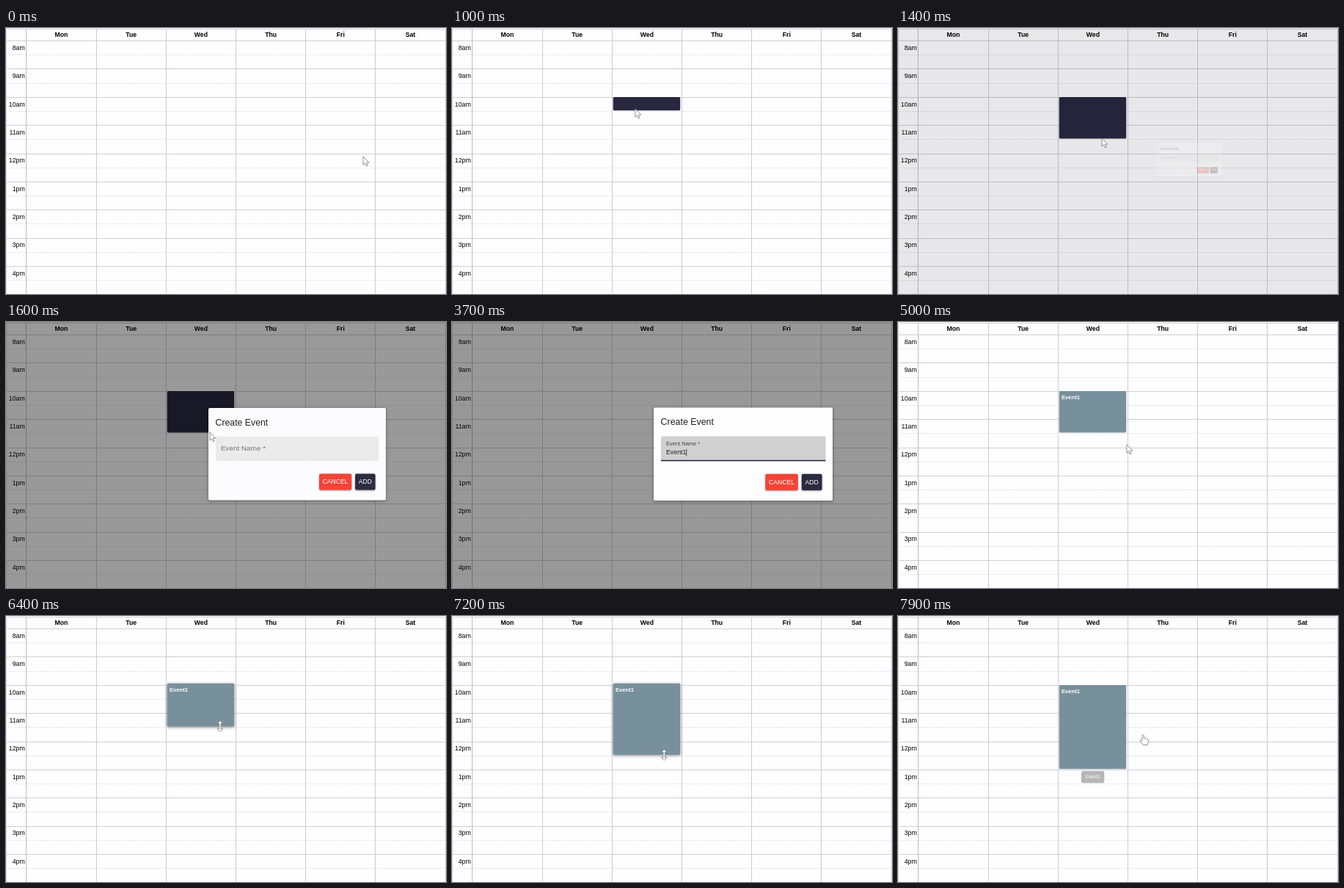
An HTML page for the animation above (8000 ms loop, 600 by 362 pixels).

```html
<!DOCTYPE html>
<html lang="en">
<head>
<meta charset="utf-8">
<title>Week planner</title>
<style>
html, body { margin: 0; width: 100%; height: 100%; overflow: hidden; background: #fefdff; }
svg { display: block; width: 600px; height: 362px; }
text { font-family: "Liberation Sans", Arial, sans-serif; }
.shadow { filter: drop-shadow(0 1px 1px rgba(0,0,0,.4)); }
.lift { filter: drop-shadow(0 1px 2px rgba(0,0,0,.4)); }
</style>
</head>
<body>
<svg id="stage" viewBox="0 0 600 362"></svg>
<script>
const LOOP = 8000, STEP = 100;
const LEFT = 27.9, COLUMN = 95.2, TOP = 17.5, ROW = 38.375, SLOT = ROW / 2;
const NAVY = '#28273f', SLATE = '#78909c', PAPER = '#fefdff';
const BLOCK_TOP = 94, BLOCK_HEIGHT = 3 * SLOT - 1, EDGE = 150;
const CENTER = { x: 397, y: 179.7 };
const stage = document.getElementById('stage');

function set(el, attrs) {
  for (const key in attrs) el.setAttribute(key, attrs[key]);
}
function add(parent, tag, attrs, text = '') {
  const el = document.createElementNS('http://www.w3.org/2000/svg', tag);
  set(el, attrs);
  el.textContent = text;
  return parent.appendChild(el);
}
const show = (el, visible) => set(el, { visibility: visible ? 'visible' : 'hidden' });
const rect = (parent, x, y, width, height, fill, rx = 0, more = {}) =>
  add(parent, 'rect', { x, y, width, height, fill, rx, ...more });
const label = (parent, x, y, size, text, more = {}) =>
  add(parent, 'text', { x, y, 'font-size': size, fill: '#222', ...more }, text);
const line = (x1, y1, x2, y2, stroke, more = {}) =>
  add(stage, 'line', { x1, y1, x2, y2, stroke, ...more });

const clamp = (v, low, high) => Math.max(low, Math.min(high, v));
const ramp = (t, from, to) => clamp((t - from) / (to - from), 0, 1);
const smooth = (t, from, to) => { const k = ramp(t, from, to); return k * k * (3 - 2 * k); };
const pulse = (t, from, to) => ramp(t, from, from + 200) - ramp(t, to, to + 200);
const crisp = v => Math.floor(v) + .5;

function buildCalendar() {
  rect(stage, 0, 0, 600, 362, PAPER);
  line(0, 1.5, 600, 1.5, '#d2d1d4');
  for (let i = 0; i < 9; i++) {
    const y = TOP + i * ROW, hour = (i + 7) % 12 + 1;
    line(0, crisp(y), 600, crisp(y), '#d0cfd2');
    line(0, crisp(y + SLOT), 600, crisp(y + SLOT), '#dbdadd', { 'stroke-dasharray': '1 1' });
    label(stage, 25.8, y + 12.3, 8.8, hour + (i < 4 ? 'am' : 'pm'), { 'text-anchor': 'end', fill: '#000' });
  }
  line(.5, 1, .5, 362, '#d6d5d8');
  line(27.5, 1, 27.5, 362, '#bdbcbf');
  ['Mon', 'Tue', 'Wed', 'Thu', 'Fri', 'Sat'].forEach((day, i) => {
    const x = crisp(LEFT + (i + 1) * COLUMN);
    line(x, 1, x, 362, '#cdccd0');
    label(stage, LEFT + (i + .5) * COLUMN, 12, 8.7, day,
      { 'text-anchor': 'middle', 'font-weight': 'bold', fill: '#000' });
  });
}

function buildDialog() {
  const root = add(stage, 'g', {});
  rect(root, 275, 116.5, 244, 126.5, PAPER, 2, { class: 'lift' });
  label(root, 284.6, 140.3, 12.4, 'Create Event');
  const field = rect(root, 285, 155.5, 224.5, 33.5, '#ececec', 2);
  const underline = rect(root, 285, 187.8, 224.5, 1.6, NAVY);
  const hint = label(root, 292, 175.3, 10, 'Event Name *');
  const input = label(root, 292, 180.4, 8.8, '');
  const caret = rect(root, 292, 173, .8, 9.5, '#222');
  const button = (x, width, fill, text) => {
    rect(root, x, 206.8, width, 22.2, fill, 2, { class: 'shadow' });
    label(root, x + width / 2, 220.6, 8.7, text, { fill: '#fff', 'text-anchor': 'middle' });
  };
  button(427.3, 44.5, '#f44336', 'CANCEL');
  button(476.8, 27.7, '#2b2a40', 'ADD');
  return { root, field, underline, hint, input, caret };
}

function buildCursors() {
  const make = (d, fill = '#fff') => add(stage, 'path',
    { d, fill, stroke: '#777', 'stroke-width': .8, 'stroke-linejoin': 'round' });
  return {
    arrow: make('M0 0V11.2L2.6 8.8 4.4 13 6.2 12.2 4.4 8.2H8Z'),
    beam: make('M-2 -5.5H2M0 -5.5V5.5M-2 5.5H2', 'none'),
    hand: make('M0 1Q1.2 -.8 2.3 1V5L3.7 4.7 4.6 5.4 6 5.1 6.8 6.1Q8.4 5.6 8.4 7.2V10L7 14H1.2L-2.6 8.6Q-2.6 7 -1 7.4L0 8.2Z'),
    resize: make('M0 -7.5L3.7 -3.7H1.2V3.7H3.7L0 7.5 -3.7 3.7H-1.2V-3.7H-3.7Z')
  };
}

buildCalendar();
const selection = rect(stage, 219.7, BLOCK_TOP, 91.5, 0, NAVY, 1.5);
const block = add(stage, 'g', {});
const blockBox = rect(block, 219.7, BLOCK_TOP, 91.5, BLOCK_HEIGHT, SLATE, 1.5);
const blockName = label(block, 223, 0, 7.6, 'Event1', { fill: '#fff', 'font-weight': 'bold' });
const tip = add(stage, 'g', {});
rect(tip, 250, 0, 31.3, 16.3, '#616161', 2.2);
label(tip, 265.6, 10.4, 6.4, 'Event1', { fill: '#fff', 'text-anchor': 'middle' });
const dim = rect(stage, 0, 0, 600, 362, '#000');
const dialog = buildDialog();
const cursors = buildCursors();

// The pointer glides to each stop in turn and rests there until the next glide.
const home = { x: 487, y: 175 };
const glides = [
  { from: 0, to: 900, x: 240, y: 96 },
  { from: 900, to: 1200, x: 278, y: EDGE },
  { from: 1900, to: 2400, x: 318, y: 173 },
  { from: 4800, to: 5700, x: 270, y: 125 },
  { from: 5700, to: 6400, x: 292, y: EDGE },
  { from: 6700, to: 7500, x: 288, y: 207 },
  { from: 7600, to: 7900, x: 333, y: 161.5 }
];
function pointerAt(t) {
  return glides.reduce((p, g) => {
    const k = smooth(t, g.from, g.to);
    return { x: p.x + (g.x - p.x) * k, y: p.y + (g.y - p.y) * k };
  }, home);
}

function pointerKind(t) {
  if (t < 2100) return 'arrow';
  if (t < 2700) return 'beam';
  if (t < 4900) return null;
  if (t < 5300) return 'arrow';
  return t >= 6300 && t <= 7600 ? 'resize' : 'hand';
}

function drawEvent(t, pointer) {
  const picked = clamp(Math.ceil((pointer.y - BLOCK_TOP - 1) / SLOT), 1, 3);
  set(selection, { height: picked * SLOT - 1 });
  show(selection, t >= 1000 && t < 2400);

  const held = t >= 6400 && t < 7600;
  const top = BLOCK_TOP - (held ? 2.2 : 0);
  const dragged = t < 7600 ? Math.round((pointer.y - EDGE) / SLOT) : 3;
  const bottom = BLOCK_TOP + BLOCK_HEIGHT + (t > 6400 ? dragged * SLOT : 0);
  set(block, { class: held ? 'lift' : '' });
  set(blockBox, { y: top, height: bottom - top });
  set(blockName, { y: top + 11.1 });
  show(block, t >= 4100);
  set(tip, {
    opacity: .9 * (pulse(t, 5400, 6000) + pulse(t, 7500, 7800)),
    transform: `translate(0 ${bottom + 2.8})`
  });
}

function drawDialog(t) {
  const opening = t < 4000;
  const level = opening ? smooth(t, 1250, 1620) ** 1.5 : 1 - smooth(t, 4000, 4400);
  const scale = level ** (opening ? 2 / 3 : 2);
  const visible = t >= 1400 && level > 0;
  show(dim, visible);
  set(dim, { opacity: .4 * level });
  set(dialog.root, {
    display: visible ? 'inline' : 'none',
    opacity: level,
    transform: `translate(${CENTER.x} ${CENTER.y}) scale(${scale}) translate(${-CENTER.x} ${-CENTER.y})`
  });

  const focus = smooth(t, 2300, 2500), focused = focus > 0;
  set(dialog.field, { fill: focused ? '#d0d0d1' : '#ececec' });
  set(dialog.underline, { opacity: focus });
  set(dialog.hint, { y: 175.3 - 7.2 * focus, 'font-size': 10 - 2.5 * focus, fill: focused ? '#444' : '#767676' });
  const typed = clamp(Math.floor((t - 2800) / 180) + 1, 0, 6);
  dialog.input.textContent = 'Event1'.slice(0, typed);
  show(dialog.caret, visible && focused);
  set(dialog.caret, { x: 292 + (typed && visible ? dialog.input.getComputedTextLength() : 0) });
}

function drawPointer(t, pointer) {
  const kind = pointerKind(t);
  for (const name in cursors) {
    show(cursors[name], name === kind);
    set(cursors[name], { transform: `translate(${pointer.x} ${pointer.y})` });
  }
}

function render(ms) {
  const t = Math.floor((ms + 10) / STEP) * STEP % LOOP;
  const pointer = pointerAt(t);
  drawEvent(t, pointer);
  drawDialog(t);
  drawPointer(t, pointer);
}

const start = performance.now();
function frame() {
  render(performance.now() - start);
  requestAnimationFrame(frame);
}
frame();
</script>
</body>
</html>
```
